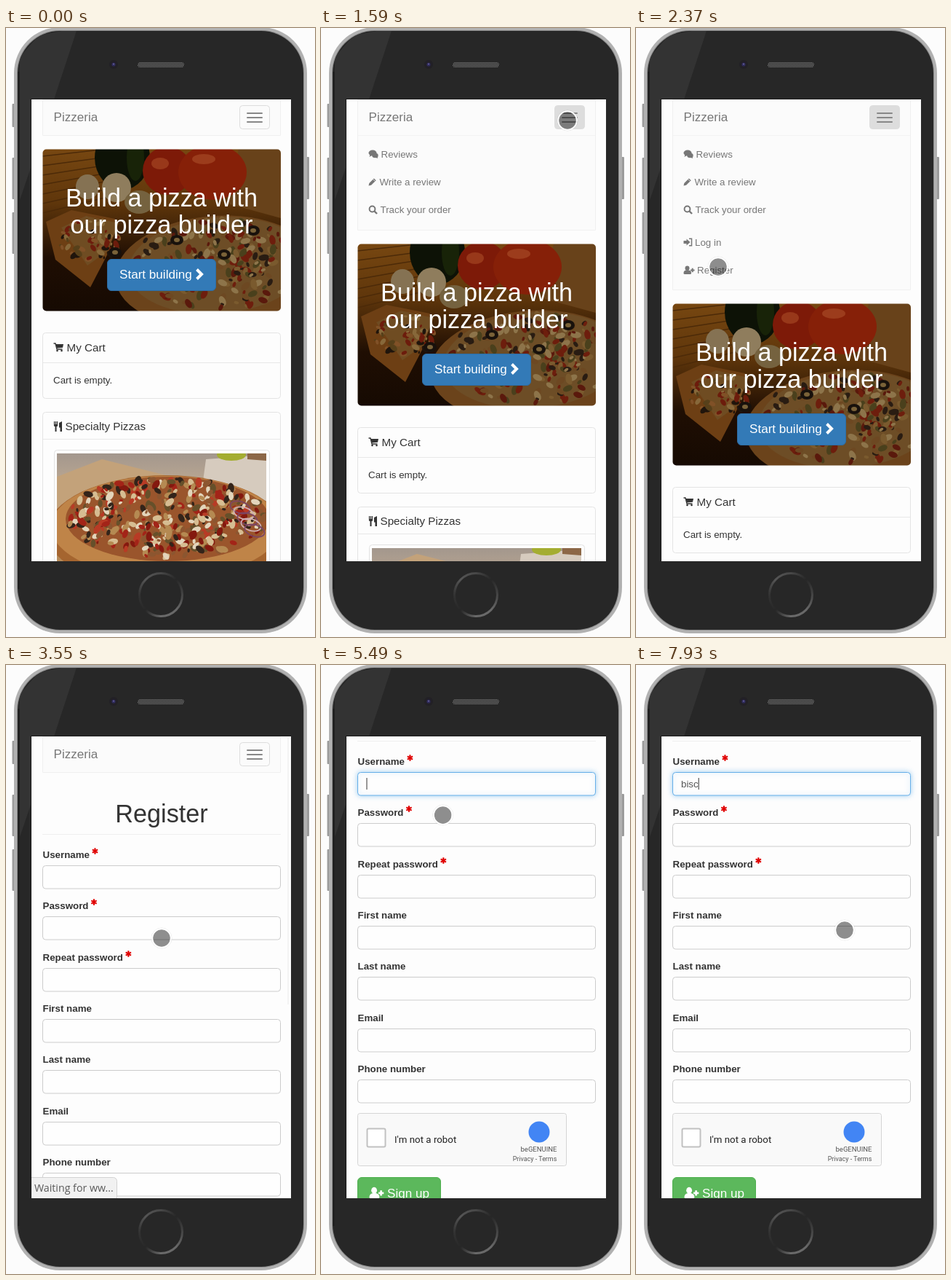
Recreate the animation shown at these times as an HTML page with a canvas. Size 425x836 px, loop 8000 ms.

```html
<!DOCTYPE html>
<html lang="en">
<head>
<meta charset="utf-8">
<title>Pizzeria sign-up</title>
<style>
  html, body { margin: 0; width: 100%; height: 100%; overflow: hidden; background: #fcfcfc; }
  canvas { display: block; width: 425px; height: 836px; }
</style>
</head>
<body>
<canvas id="stage"></canvas>
<script>
const W = 425, H = 836, LOOP = 8000, TAU = Math.PI * 2;
const SANS = '"Liberation Sans", Arial, sans-serif';
const ROBOTO = 'Roboto, sans-serif';
const BODY = 13.33;
const dpr = window.devicePixelRatio || 1;
const stage = document.getElementById('stage');
let ctx = stage.getContext('2d');
stage.width = W * dpr;
stage.height = H * dpr;

const clamp = v => Math.max(0, Math.min(1, v));
const mix = (a, b, p) => a + (b - a) * p;
const progress = (t, from, to) => clamp((t - from) / (to - from));
const smooth = p => p * p * (3 - 2 * p);

// The CSS "ease" curve, solved by bisection.
function ease(p) {
  let lo = 0, hi = 1;
  for (let i = 0; i < 20; i++) {
    const s = (lo + hi) / 2;
    if (.75 * s * (1 - s) + s ** 3 < p) lo = s; else hi = s;
  }
  return .3 * lo * (1 - lo) ** 2 + 3 * lo * lo * (1 - lo) + lo ** 3;
}

function random(seed) {
  return () => (seed = (seed * 16807) % 2147483647) / 2147483647;
}

function rect(x, y, w, h, fill) {
  ctx.fillStyle = fill;
  ctx.fillRect(x, y, w, h);
}

function box(x, y, w, h, r, fill, stroke, width = 1) {
  ctx.beginPath();
  ctx.roundRect(x, y, w, h, r);
  if (fill) { ctx.fillStyle = fill; ctx.fill(); }
  if (stroke) { ctx.strokeStyle = stroke; ctx.lineWidth = width; ctx.stroke(); }
}

function oval(x, y, rx, ry, fill, turn = 0) {
  ctx.beginPath();
  ctx.ellipse(x, y, rx, ry, turn, 0, TAU);
  ctx.fillStyle = fill;
  ctx.fill();
}

function line(points, color, width) {
  ctx.beginPath();
  points.forEach(([x, y]) => ctx.lineTo(x, y));
  ctx.strokeStyle = color;
  ctx.lineWidth = width;
  ctx.stroke();
}

function shape(points, fill) {
  ctx.beginPath();
  points.forEach(([x, y]) => ctx.lineTo(x, y));
  ctx.fillStyle = fill;
  ctx.fill();
}

function text(s, x, y, size, color, { weight = '', family = SANS, align = 'left' } = {}) {
  ctx.font = `${weight} ${size}px ${family}`;
  ctx.textAlign = align;
  ctx.fillStyle = color;
  ctx.fillText(s, x, y);
}

function clipped(x, y, w, h, r, draw) {
  ctx.save();
  ctx.beginPath();
  ctx.roundRect(x, y, w, h, r);
  ctx.clip();
  draw();
  ctx.restore();
}

function at(x, y, draw) {
  ctx.save();
  ctx.translate(x, y);
  draw();
  ctx.restore();
}

function vertical(y0, y1, ...colors) {
  const g = ctx.createLinearGradient(0, y0, 0, y1);
  colors.forEach((c, i) => g.addColorStop(i / (colors.length - 1), c));
  return g;
}

// ---- pictures, painted once ----

function picture(w, h, paint) {
  const c = document.createElement('canvas');
  c.width = w * dpr;
  c.height = h * dpr;
  const main = ctx;
  ctx = c.getContext('2d');
  ctx.scale(dpr, dpr);
  paint(w, h);
  ctx = main;
  return c;
}

function toppings(cx, cy, rx, ry, count, size, colors, seed) {
  const rnd = random(seed);
  for (let i = 0; i < count; i++) {
    const a = rnd() * TAU, d = Math.sqrt(rnd()), s = size * (.5 + rnd());
    oval(cx + Math.cos(a) * d * rx, cy + Math.sin(a) * d * ry, s, s * .6,
      colors[Math.floor(rnd() * colors.length)], rnd() * 3);
  }
}

const heroPicture = picture(328, 223, (w, h) => {
  rect(0, 0, w, h, vertical(0, h, '#774711', '#5f360b', '#1f0e03', '#160a02'));
  for (let i = 0; i < 7; i++) line([[0, 10 + i * 13], [90, i * 11]], '#4c2a08', 1.5);
  shape([[270, 0], [328, 0], [328, 95], [255, 75]], '#68421a');
  oval(110, 12, 38, 44, '#0d1206');
  oval(128, 12, 12, 32, '#182308');
  oval(172, 30, 34, 33, '#7d1a08');
  oval(234, 32, 47, 38, '#862008');
  oval(162, 20, 12, 8, '#98381a');
  oval(222, 14, 16, 7, '#9c3c1c');
  oval(62, 52, 16, 17, '#857253');
  oval(102, 53, 20, 20, '#8f7d5d');
  oval(133, 73, 20, 16, '#75623f');
  shape([[5, 100], [40, 84], [100, 96], [92, 140], [66, 190], [18, 152]], '#6d3f14');
  shape([[26, 108], [60, 92], [105, 102], [90, 140], [62, 160]], '#6f4c22');
  toppings(64, 125, 42, 28, 60, 4, ['#6c1c0c', '#87683a', '#20150c', '#57401a', '#805127'], 41);
  oval(238, 168, 138, 76, '#6b431b', -.08);
  oval(242, 160, 124, 66, '#6d4d26', -.08);
  toppings(242, 158, 118, 62, 260, 5,
    ['#6d1e0d', '#5a190c', '#8d744a', '#291c12', '#4a401c', '#7a5a2e', '#6d4822'], 97);
  [[100, 142], [185, 125], [250, 145], [290, 112], [210, 180]].forEach(([x, y]) => {
    oval(x, y, 9, 7, '#18110c');
    oval(x, y, 4, 3, '#7a6238');
  });
});

const boxPicture = picture(288, 190, (w, h) => {
  rect(0, 0, w, h, vertical(0, 100, '#a3978d', '#c0ab93', '#b58a59'));
  shape([[0, 32], [62, 8], [150, 30], [0, 80]], '#c3a27a');
  shape([[205, 8], [288, 2], [288, 90], [200, 45]], '#d6cbbe');
  shape([[262, 0], [288, 0], [288, 10], [262, 8]], '#8c6747');
  oval(240, 2, 20, 8, '#a4ad31');
  oval(150, 108, 164, 78, '#a5652f');
  oval(150, 101, 158, 70, '#bf8448');
  oval(152, 90, 140, 58, '#9a552c');
  toppings(152, 88, 136, 54, 420, 5,
    ['#a32418', '#84190f', '#b83b25', '#d6bd92', '#b58a52', '#66502a', '#33241a', '#e3d5bb', '#8c5630'], 23);
  for (let i = 0; i < 5; i++) {
    ctx.beginPath();
    ctx.ellipse(252 + i * 5, 74 + i * 8, 14, 8, .3, 0, TAU);
    ctx.strokeStyle = i % 2 ? '#d0aeb0' : '#7d4662';
    ctx.lineWidth = 1.8;
    ctx.stroke();
  }
});

// ---- icons, each drawn from its top left corner ----

const icons = {
  comments(c) {
    oval(5.5, 4, 5.5, 4, c);
    shape([[1, 9.5], [2, 6], [5, 7]], c);
    oval(9, 7.5, 4.2, 3.2, c);
    shape([[12.5, 11.5], [9, 10], [12, 8.5]], c);
  },
  pencil(c) {
    shape([[0, 11], [.8, 7.5], [7.4, .9], [10.2, 3.7], [3.5, 10.3]], c);
    line([[6, 2], [9, 5]], '#fbfbfb', .8);
  },
  search(c) {
    ctx.beginPath();
    ctx.arc(5, 5, 3.9, 0, TAU);
    ctx.strokeStyle = c;
    ctx.lineWidth = 2;
    ctx.stroke();
    line([[8, 8], [11.5, 11.5]], c, 2.4);
  },
  login(c) {
    shape([[0, 3.5], [4, 3.5], [4, 1], [9, 5.5], [4, 10], [4, 7.5], [0, 7.5]], c);
    line([[7.5, .8], [11, .8], [11, 10.2], [7.5, 10.2]], c, 1.5);
  },
  user(c) {
    oval(5, 3.2, 3, 3.3, c);
    box(0, 6, 10.5, 5.5, [4, 4, 1.5, 1.5], c);
    rect(9.5, 5, 5.5, 2, c);
    rect(11.2, 3.2, 2, 5.5, c);
  },
  cart(c) {
    line([[0, 1], [2.5, 1], [4.5, 9], [12, 9]], c, 1.4);
    shape([[3, 2], [13.5, 2], [12.5, 6.8], [4.2, 7.6]], c);
    oval(5, 11, 1.3, 1.3, c);
    oval(11, 11, 1.3, 1.3, c);
  },
  cutlery(c) {
    [1, 3, 5].forEach(x => rect(x - .6, 0, 1.2, 5, c));
    box(.4, 4, 5.2, 3, 1.5, c);
    rect(2, 5, 2, 9, c);
    shape([[7.5, 2], [11.5, 0], [11.5, 14], [9, 14], [9, 8.5], [7.5, 8.5]], c);
  }
};

function icon(name, x, y, color, size = 1) {
  at(x, y, () => { ctx.scale(size, size); icons[name](color); });
}

function asterisk(x, y) {
  for (let i = 0; i < 3; i++) {
    const a = Math.PI / 2 + i * Math.PI / 3, dx = Math.cos(a) * 4.2, dy = Math.sin(a) * 4.2;
    line([[x - dx, y - dy], [x + dx, y + dy]], '#e00000', 2.2);
  }
}

// ---- phone ----

function phone() {
  rect(0, 0, W, H, '#fcfcfc');
  [[104, 32], [178, 57], [253, 57]].forEach(([y, h]) => box(8.5, y, 4, h, 1, '#9b9b9b'));
  box(412.5, 177, 4.5, 58, 1, '#9b9b9b');
  box(11, -1, 403, 832, 63, '#b1b1b1');
  box(15, 3, 395, 824, 59, '#8a8a8a');
  clipped(16, 4, 393, 822, 58, () => {
    rect(0, 0, W, H, '#272727');
    shape([[98, 0], [94, 13], [66, 98], [19, 236], [19, 40], [45, 10]], '#333333');
    rect(16, 60, 3, 710, '#202020');
  });
  oval(148, 50, 6, 6, '#222026');
  oval(148, 50, 2.6, 2.6, '#2f2b5c');
  oval(148, 49.5, 1, 1, '#6a659c');
  clipped(181, 47, 64, 7, 3.5, () => {
    rect(181, 47, 64, 7, '#3c3c3c');
    for (let y = 0; y < 4; y++)
      for (let x = 0; x < 32; x++) rect(181 + x * 2 + y % 2, 47 + y * 2, 1, 1, '#777');
  });
  const ring = ctx.createConicGradient(0, 213, 778);
  ['#454545', '#686868', '#6a6a6a', '#272727', '#333', '#555', '#484848', '#272727', '#454545']
    .forEach((c, i) => ring.addColorStop(i / 8, c));
  ctx.beginPath();
  ctx.arc(213, 778, 29.5, 0, TAU);
  ctx.strokeStyle = ring;
  ctx.lineWidth = 3;
  ctx.stroke();
  rect(34, 97, 358, 635, '#1b1b1b');
  rect(35, 98, 357, 634, '#fdfdfd');
}

// ---- pages ----

function navbar(open, pressed, linkActive) {
  const bottom = 147.5 + open;
  box(50.5, 98.5, 327, bottom - 98.5, 0, '#fbfbfb', '#f0f0f0');
  text('Pizzeria', 65.5, 128, 17.1, '#777');
  box(321.5, 106.5, 41, 32, 4, pressed ? '#dddddd' : null, '#dddddd');
  [116, 122, 128].forEach(y => box(331, y, 22, 2, 1, '#888'));
  if (!open) return;
  rect(51, 147, 326, 1, '#f3f3f3');
  clipped(51, 148, 326, open - 1, 0, () => {
    const items = [
      ['comments', 'Reviews', 82.5, 178], ['pencil', 'Write a review', 80.5, 216],
      ['search', 'Track your order', 81.5, 254], ['login', 'Log in', 81, 299],
      ['user', 'Register', 84, 337]
    ];
    for (const [glyph, label, x, y] of items) {
      const color = linkActive && label === 'Register' ? '#333' : '#777';
      icon(glyph, 65.5, y - 10.5, color);
      text(label, x, y, BODY, color);
    }
  });
}

function panel(y, h, head, glyph, title, x, baseline) {
  box(50.5, y + .5, 327, h, 4, '#fdfdfd', '#e4e4e4');
  rect(51, y + head, 326, 1, '#e8e8e8');
  icon(glyph, 65.5, baseline - 12, '#333');
  text(title, x, baseline, 15.2, '#333');
}

function homePage(open, pressed, linkActive) {
  at(0, open, () => {
    clipped(50.5, 166.5, 327.5, 222, 5, () => ctx.drawImage(heroPicture, 50, 166, 328, 223));
    text('Build a pizza with', 214, 245, 34.2, '#fff', { align: 'center' });
    text('our pizza builder', 214, 282, 34.2, '#fff', { align: 'center' });
    box(139.5, 317.5, 149, 43, 5.5, '#337ab7', '#2e6da4');
    text('Start building', 156, 344, 17.1, '#fff');
    line([[262.5, 331.5], [269, 338], [262.5, 344.5]], '#fff', 4);
    panel(418, 90, 41, 'cart', 'My Cart', 83.5, 444);
    text('Cart is empty.', 65, 488, BODY, '#333');
    panel(527, 400, 37, 'cutlery', 'Specialty Pizzas', 81.5, 552);
    box(66.5, 579.5, 296, 220, 4, '#fdfdfd', '#e2e2e2');
    ctx.drawImage(boxPicture, 70, 584, 288, 190);
  });
  navbar(open, pressed, linkActive);
}

const labels = ['Username', 'Password', 'Repeat password', 'First name',
  'Last name', 'Email', 'Phone number'];

function registerPage(scroll, focus, typed, caret) {
  at(0, -scroll, () => {
    navbar(0, false);
    text('Register', 214, 216, 34.2, '#333', { align: 'center' });
    rect(50, 232, 328, 1, '#efefef');
    labels.forEach((label, i) => {
      const y = Math.round(i * 70.3);
      text(label, 50.5, 265 + y, BODY, '#333', { weight: 'bold' });
      if (i < 3) asterisk(50.5 + ctx.measureText(label).width + 7.5, 255.5 + y);
      ctx.save();
      if (i === 0 && focus) {
        ctx.shadowColor = `rgba(102,175,233,${.6 * focus})`;
        ctx.shadowBlur = 7 * dpr;
      }
      const tone = i ? '#cccccc'
        : `rgb(${mix(204, 102, focus)},${mix(204, 175, focus)},${mix(204, 233, focus)})`;
      box(50.5, 275.5 + y, 327, 31.5, 4, '#fefefe', tone);
      ctx.restore();
    });
    text(typed, 62, 296, BODY, '#555');
    if (caret) rect(typed ? 62 + ctx.measureText(typed).width : 62.5, 283, 1, 16, '#333');
    captcha();
    box(50.5, 831.5, 114, 43, 5.5, '#5cb85c', '#4cae4c');
    icon('user', 66.5, 845, '#fff', 1.32);
    text('Sign up', 91, 859, 17.1, '#fff');
  });
}

function captcha() {
  box(50.5, 743.5, 287, 72, 3, '#f9f9f9', '#d5d5d5');
  box(63.5, 764.5, 25, 25, 2, '#fff', '#c1c1c1', 2);
  text("I'm not a robot", 101, 784, 13.3, '#222', { family: ROBOTO });
  oval(300, 769, 14.5, 14.5, '#4285f4');
  text('beGENUINE', 299.5, 796, 9.5, '#555', { family: ROBOTO, align: 'center' });
  text('Privacy - Terms', 294, 809, 8.9, '#555', { family: ROBOTO, align: 'center' });
}

function statusBubble() {
  box(34.5, 703.5, 118, 30, [0, 5, 0, 0], '#f1f1f1', '#d2d2d2');
  text('Waiting for ww...', 39, 723, 14.2, '#5a5a5a', { family: '"Open Sans", sans-serif' });
}

// ---- pointer: time, x, y ----

const path = [
  [350, 290, 204], [1020, 339, 127], [1950, 339, 127], [2130, 253, 195],
  [2210, 195, 227], [2290, 147, 270], [2370, 113, 328], [3060, 113, 328],
  [3170, 131, 337], [3370, 131, 337], [3550, 214, 375], [3890, 214, 375],
  [4330, 201, 238], [4540, 201, 238], [4710, 188, 229], [4980, 136, 164],
  [5370, 136, 164], [5780, 287, 364], [LOOP, 287, 364]
];

function pointer(t) {
  if (t < path[0][0]) return;
  const i = path.findIndex(k => t < k[0]);
  const [t0, x0, y0] = path[i - 1], [t1, x1, y1] = path[i];
  const linear = t0 >= 1950 && t1 <= 2370;
  const p = linear ? progress(t, t0, t1) : smooth(progress(t, t0, t1));
  const x = mix(x0, x1, p), y = mix(y0, y1, p);
  const ring = (r, color, width) => {
    ctx.beginPath();
    ctx.arc(x, y, r, 0, TAU);
    ctx.strokeStyle = color;
    ctx.lineWidth = width;
    ctx.stroke();
  };
  oval(x, y, 12, 12, 'rgba(0,0,0,.44)');
  ring(14, 'rgba(0,0,0,.1)', .8);
  ring(12.8, 'rgba(255,255,255,.95)', 2);
}

function typedText(t) {
  return 'bisc'.slice(0, [7290, 7520, 7750, 7930].filter(k => t >= k).length);
}

function caretOn(t) {
  return (t >= 5170 && t < 5680) || (t >= 6190 && t < 6700) || t >= 7160;
}

function scrollbar(t, scroll) {
  const alpha = t < 3900
    ? mix(.8, .2, progress(t, 3380, 3550))
    : .8 * (1 - progress(t, 4760, 5000));
  rect(387, 100 + scroll * 74 / 128, 2, 366, `rgba(205,205,205,${alpha})`);
}

function draw(t) {
  ctx.setTransform(dpr, 0, 0, dpr, 0, 0);
  phone();
  clipped(35, 98, 357, 634, 0, () => {
    if (t < 3130) {
      const open = Math.round(212 * ease(progress(t, 1467, 1817)));
      homePage(open, t >= 1340 && t < 2550, t >= 2550);
    } else {
      const scroll = Math.round(128 * smooth(progress(t, 3910, 4330)));
      registerPage(scroll, ease(progress(t, 5170, 5400)), typedText(t), caretOn(t));
      scrollbar(t, scroll);
    }
    if (t >= 3050 && t < 4580) statusBubble();
    pointer(t);
  });
}

const start = performance.now();
function tick() {
  draw((performance.now() - start) % LOOP);
  requestAnimationFrame(tick);
}
tick();
</script>
</body>
</html>
```
